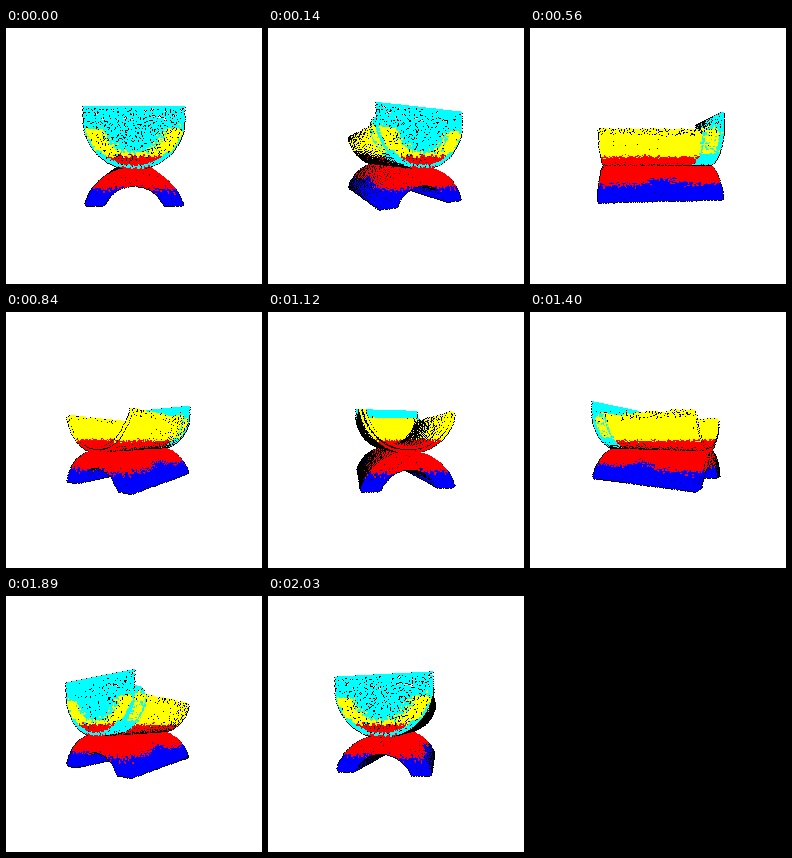
A matplotlib script that plays this animation: 256 px wide and 256 px high, repeating every 2.1 s.

```python
import numpy as np
import matplotlib.pyplot as plt
from matplotlib.animation import FuncAnimation

SIZE, FRAMES, INTERVAL = 256, 30, 70
DIST, FOCAL = 5.3, 197
HALF = 1.38              # half length of the body along its axis
TOP_C, LOW_C = 0.75, -1.25   # centres of the trough and the arch
RIM, FLOOR, INNER = 0.6, -0.98, 0.67

PALETTE = np.array([[0, 0, 0], [0, 0, 255], [255, 0, 0],
                    [255, 255, 0], [0, 255, 255]], np.uint8)
BLACK, BLUE, RED, YELLOW, CYAN = range(5)

rng = np.random.default_rng(4)
points, tints = [], []


def add(x, y, z, tint):
    x, y, z, tint = np.broadcast_arrays(x, y, z, tint)
    points.append(np.stack([x.ravel(), y.ravel(), z.ravel()], 1))
    tints.append(tint.ravel())


def mesh(a, b, c, d, step=0.033):
    """Slightly jittered grid over [a, b] x [c, d]."""
    u, v = np.meshgrid(np.arange(a, b, step), np.arange(c, d, step))
    u = u + rng.normal(0, 0.006, u.shape)
    v = v + rng.normal(0, 0.006, v.shape)
    return u.ravel().clip(a, b), v.ravel().clip(c, d)


def low_tint(y, z):
    edge = -0.66 + 0.13 * np.exp(-(y / 0.35) ** 2)
    return np.where(z + rng.normal(0, 0.04, z.shape) < edge, BLUE, RED)


def high_tint(z):
    return np.where(z + rng.normal(0, 0.02, z.shape) < 0, RED, YELLOW)


def trough(radius, outer):
    a, y = mesh(-1.75, 1.75, -HALF, HALF)
    x, z = radius * np.sin(a), TOP_C - radius * np.cos(a)
    near = y + HALF
    rim = RIM + 0.13 * np.exp(-((near - 0.18) / 0.17) ** 2)
    keep = (z < rim) & ((z < 0.47) | (rng.random(z.size) < 0.5))
    tint = high_tint(z)
    if outer:
        patch = (abs(near - 0.25) < 0.16) & (abs(z - 0.34) < 0.27)
        end = (near < 0.47 + rng.normal(0, 0.03, z.size)) & (z > -0.2)
        mixed = patch & (rng.random(z.size) < 0.85)
        tint = np.where(end & ~mixed, CYAN, tint)
    add(x[keep], y[keep], z[keep], tint[keep])


def arch(radius):
    a, y = mesh(-1.4, 1.4, -HALF, HALF, 0.033 if radius > 0.9 else 0.04)
    x, z = radius * np.sin(a), LOW_C + radius * np.cos(a)
    keep = z > FLOOR
    add(x[keep], y[keep], z[keep], low_tint(y, z)[keep])


def arch_ends():
    for y in (-HALF, HALF):
        x, z = mesh(-1, 1, FLOOR, -0.25, 0.03)
        r = np.hypot(x, z - LOW_C)
        keep = (r > INNER) & (r < 1)
        add(x[keep], y, z[keep], low_tint(np.full(z.shape, y), z)[keep])
    for side in (-1, 1):
        x, y = mesh(0.62, 0.96, -HALF, HALF, 0.04)
        add(side * x, y, FLOOR, BLUE)


def plate_tint(x, z):
    r = np.hypot(x, z - TOP_C)
    face = np.where(r < INNER + rng.normal(0, 0.05, z.size), CYAN, high_tint(z))
    face = np.where((r > 0.93) & (z < 0.1), CYAN, face)
    return np.where(z > RIM - 0.05, CYAN, face)


def plate():
    def inside(x, z):
        return (np.hypot(x, z - TOP_C) < 1) | (z > RIM)

    x, z = rng.uniform(-1, 1, 2600), rng.uniform(-0.25, 0.98, 2600)
    keep = inside(x, z)
    add(x[keep], -HALF, z[keep], plate_tint(x, z)[keep])

    x, z = mesh(-1, 1, -0.25, 0.72, 0.032)
    keep = inside(x, z)
    add(x[keep], -HALF + 0.1, z[keep], plate_tint(x, z)[keep])

    x, z = mesh(-1, 1, -0.25, 0.72, 0.036)
    keep = inside(x, z)
    add(x[keep], -HALF + 0.22, z[keep], high_tint(z)[keep])

    x = np.linspace(-1, 1, 70)
    add(x, -HALF, 0.98, CYAN)


trough(1.0, True)
trough(0.92, False)
arch(1.0)
arch(INNER)
arch_ends()
plate()
points = np.concatenate(points)
tints = np.concatenate(tints)

# Each dot is a 2x2 square with a few black pixels just behind it.
FILL = [(0, 0), (1, 0), (0, 1), (1, 1)]
SHADE = [(-1, 0), (2, 1), (0, 2)]


def render(i):
    t = 2 * np.pi * i / FRAMES
    c, s = np.cos(t), np.sin(t)
    x, y, z = points.T
    across = c * x - s * y
    toward = -c * y - s * x
    scale = FOCAL / (DIST - toward)
    col = np.floor(127.5 + across * scale).astype(int)
    row = np.floor(127.5 - z * scale).astype(int)

    dots = FILL + SHADE
    cols = np.concatenate([col + dx for dx, _ in dots])
    rows = np.concatenate([row + dy for _, dy in dots])
    depth = np.concatenate([toward] * len(FILL) + [toward - 0.07] * len(SHADE))
    ink = np.concatenate([tints] * len(FILL)
                         + [np.zeros_like(tints)] * len(SHADE))
    order = np.argsort(depth, kind="stable")
    img = np.full((SIZE, SIZE, 3), 255, np.uint8)
    img[rows[order], cols[order]] = PALETTE[ink[order]]
    return img


fig = plt.figure(figsize=(SIZE / 100, SIZE / 100), dpi=100, facecolor="white")
ax = fig.add_axes([0, 0, 1, 1])
ax.axis("off")
view = ax.imshow(render(0), interpolation="nearest", aspect="auto")


def update(i):
    view.set_data(render(i))
    return (view,)


anim = FuncAnimation(fig, update, frames=FRAMES, interval=INTERVAL,
                     repeat=True, repeat_delay=0, blit=False)
plt.show()
```
